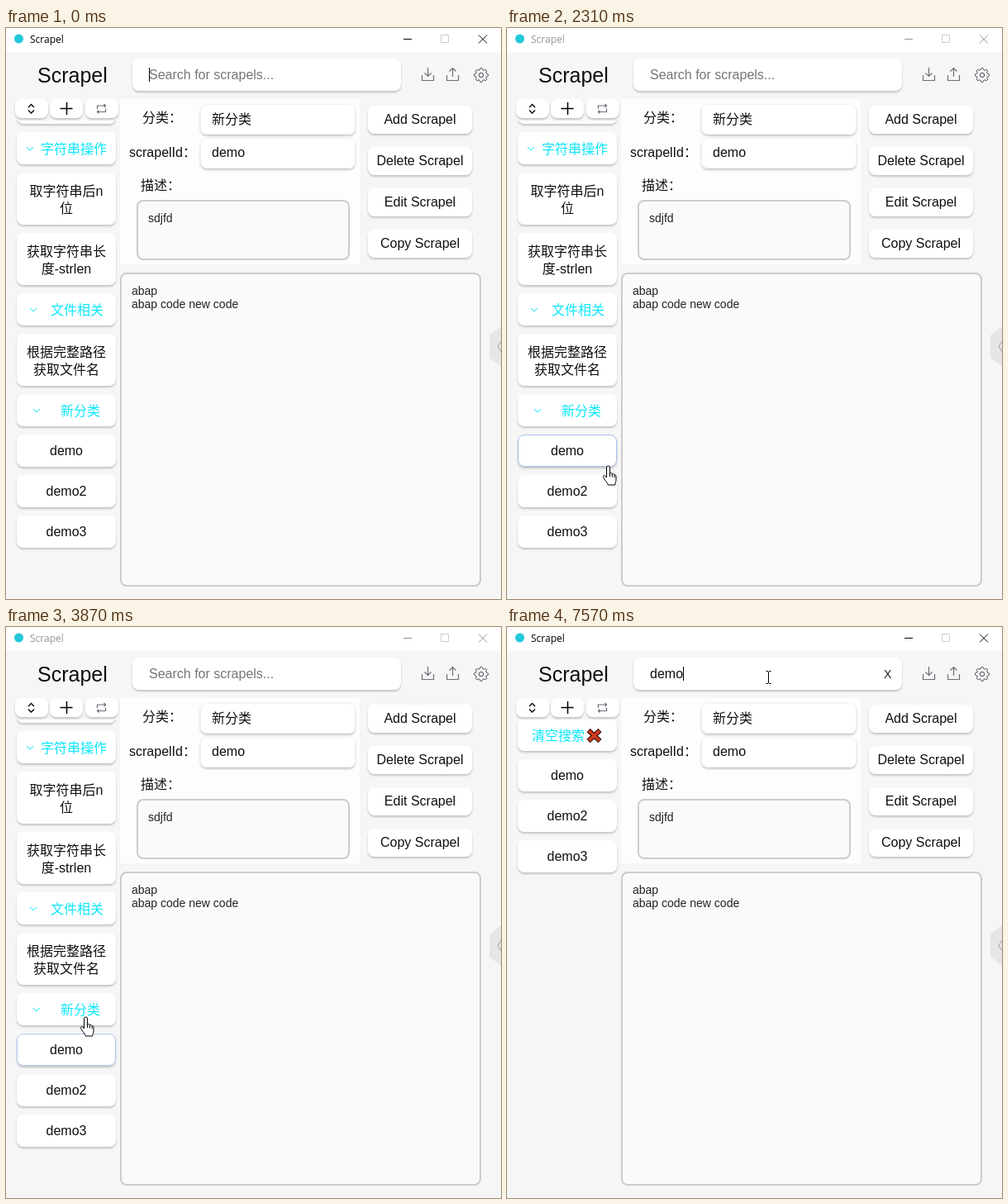
Recreate the animation shown at these times as an HTML page. Size 599 by 691 pixels, loop 8 s.

```html
<!DOCTYPE html>
<html lang="zh">
<head>
<meta charset="utf-8">
<title>Scrapel</title>
<style>
  html, body { margin: 0; width: 100%; height: 100%; overflow: hidden; background: #f6f6f6; }
  svg { display: block; width: 599px; height: 691px; }
  text { font: 16px "Liberation Sans", "Noto Sans CJK SC", "Noto Sans CJK", sans-serif; fill: #0f0f0f; white-space: pre; }
  .title { font: 12px "Open Sans", "Noto Sans", sans-serif; fill: #000; }
  .head { font-size: 25px; }
  .small { font-size: 14px; fill: #222; }
  .mid { text-anchor: middle; }
  .cyan { fill: #0ae6fa; }
  .hint { fill: #757575; }
  .btn { fill: #fff; filter: drop-shadow(0 2px 1px rgba(0, 0, 0, .2)); }
  .rim { fill: none; stroke: #f1f1f1; }
  .area { fill: #fafafa; stroke: #ccc; stroke-width: 2; }
  .line { fill: none; stroke: #000; }
  .icon { fill: none; stroke: #6b6f76; stroke-width: 1.2; }
  .gear { fill: none; stroke: #484c55; }
  .tick { fill: none; stroke: #0ae6fa; }
  .hover { fill: none; stroke: #396cd8; opacity: 0; }
  .cur { stroke: #000; fill: #fff; stroke-linejoin: round; }
</style>
</head>
<body>
<svg viewBox="0 0 599 691">
  <rect width="599" height="29" fill="#fff"/>
  <circle cx="15.5" cy="13" r="5.5" fill="#24c8db"/>
  <g id="frame">
    <text class="title" x="29" y="18">Scrapel</text>
    <path class="line" d="M481 13.5h10M572 8.5l10 10M582 8.5l-10 10"/>
  </g>
  <path fill="none" stroke="#ccc" d="M526.5 8.5h9v9h-9z"/>
  <text class="head" x="38" y="66">Scrapel</text>
  <path class="icon" d="M503.5 57v6.5h14V57M510.5 48v10.5M506.5 54.5l4 4 4-4"/>
  <path class="icon" d="M533.5 57v6.5h14V57M540.5 59V48.5M536.5 52.5l4-4 4 4"/>
  <g id="gear"></g>

  <rect x="138" y="86" width="290" height="200" fill="#fdfdfd"/>
  <g id="fields"></g>
  <g id="actions"></g>

  <text class="hint" id="hint" x="173" y="62">Search for scrapels...</text>
  <text id="query" x="173" y="62"></text>
  <text class="small" id="clear" x="456" y="62">X</text>
  <rect id="caret" y="48" width="1" height="17"/>
  <text x="165" y="114">分类：</text>
  <text x="149" y="156">scrapelId：</text>
  <text x="163" y="196">描述：</text>
  <text x="249" y="116">新分类</text>
  <text x="249" y="156">demo</text>
  <text class="small" x="172" y="235">sdjfd</text>
  <text class="small" x="152" y="323">abap</text>
  <text class="small" x="152" y="339">abap code new code</text>

  <path fill="#e6e6e6" d="M599 361l-14 11v27l14 11z"/>
  <path fill="none" stroke="#999" d="M600 378l-5 7.5 5 7.5"/>

  <clipPath id="view"><path d="M0 112h137v579H0z"/></clipPath>
  <g clip-path="url(#view)"><g id="all"></g><g id="hits"></g></g>

  <g id="tools"></g>
  <path class="line" stroke-width="1.3" d="M27 96l3.500-3.500L34 96M27 99.500l3.500 3.500 3.500-3.500"/>
  <path class="line" stroke-width="1.5" d="M65.500 97.500h15M73.500 90v15"/>
  <path class="icon" d="M110.500 98v-4h10M118.500 92l2 2-2 2M120.500 97.500v4h-10M112.500 99.500l-2 2 2 2"/>

  <g id="pointer">
    <path class="cur" id="arrow" d="M.5 .5v16l3.800-3.600 2.600 6 2.300-1-2.500-5.800h5.200z"/>
    <g class="cur" id="hand">
      <path d="M-2.500 2A2 2 0 0 1 1.500 2V9C2.500 8.200 4 8.400 4.300 9.800 5.300 9.200 6.700 9.500 7 10.800 8 10.500 9 11 9 12.800V17C9 19 7.800 20 7.800 23H-.7C-.7 21-5 17-6.500 13.500-7 12-5.500 10.700-4.300 12L-2.500 14Z"/>
      <path fill="none" d="M1.500 9v4M4.300 10v3.500M7 11v3"/>
    </g>
    <path class="line" id="beam" d="M-2.500-7.500H0M1-7.500H3.500M.5-7V7M-2.500 7.500H0M1 7.500H3.500"/>
  </g>
</svg>
<script>
const LOOP = 8000, BLUR = 190, FOCUS = 4660, BLINK = 510, FADE = 250;
const $ = id => document.getElementById(id);
const clamp = v => Math.max(0, Math.min(1, v));
const show = (id, on) => { $(id).style.display = on ? '' : 'none'; };

// Each zone gives the pointer its shape
const zones = [];
const zone = (shape, x, y, w, h) => zones.push({ shape, x, y, w, h });
const inside = (z, x, y) => x >= z.x && x < z.x + z.w && y >= z.y && y < z.y + z.h;

const rect = (cls, x, y, w, h, inset = 0) =>
  `<rect class="${cls}" x="${x + inset}" y="${y + inset}" width="${w - 2 * inset}" height="${h - 2 * inset}" rx="${8 - inset}"/>`;
const label = (x, y, s, cls = '') => `<text class="mid ${cls}" x="${x}" y="${y}">${s}</text>`;

function field(x, y, w, h) {
  zone('beam', x, y, w, h);
  return rect('btn', x, y, w, h);
}
function area(x, y, w, h) {
  zone('beam', x, y, w, h);
  return rect('area', x, y, w, h, 1);
}
const input = y => field(235, y, 188, 37) + rect('rim', 235, y, 188, 37, .5);

// Sidebar: headings start with '>', long names break at '|'
function stack(y, names, live) {
  return names.map(name => {
    const lines = name.split('|'), tall = lines.length > 1, h = tall ? 63 : 39, top = y;
    y += h + 10;
    if (live) zone('hand', 13, top, 120, h);
    const box = rect('btn', 13, top, 120, h);
    if (name[0] === '>') {
      const s = name.slice(1), dx = 4 * (5 - s.length);
      return box + label(82 + dx, top + 26, s, 'cyan') +
        `<path class="tick" d="M${25 + dx} ${top + 18}l4 4 4-4"/>`;
    }
    if (live) zones.at(-1).glow = true;
    return box + lines.map((s, i) => label(73, top + (tall ? 28 : 25) + 21 * i, s)).join('') +
      (live ? rect('hover', 13, top, 120, h, .5) : '');
  }).join('');
}

const demos = ['demo', 'demo2', 'demo3'];
$('all').innerHTML = rect('btn', 13, 77, 120, 39) + stack(126, [
  '>字符串操作', '取字符串后n|位', '获取字符串长|度-strlen',
  '>文件相关', '根据完整路径|获取文件名', '>新分类', ...demos
], true);
$('hits').innerHTML = rect('btn', 13, 111, 120, 39) + label(62, 137, '清空搜索', 'cyan') +
  '<path id="cross" d="M98.500 125l14 13M112.500 125l-14 13" stroke="#3a1510" stroke-width="6"/>' +
  '<path d="M99 125.500l13 12M112 125.500l-13 12" stroke="#d33a1c" stroke-width="3.6"/>' +
  stack(160, demos);

$('fields').innerHTML = field(153, 37, 325, 39) + input(92) + input(133) +
  area(158, 208, 258, 73) + area(138, 296, 437, 380);
$('actions').innerHTML = ['Add', 'Delete', 'Edit', 'Copy'].map((s, i) => {
  const y = 94 + 50 * i;
  zone('hand', 438, y, 126, 34);
  return rect('btn', 438, y, 126, 34) + label(501, y + 22, s + ' Scrapel');
}).join('');
$('tools').innerHTML = [11, 53, 96].map(x => rect('btn', x, 86, 40, 23)).join('');

// Gear outline: eight teeth around a hub
const teeth = Array.from({ length: 32 }, (_, i) => {
  const a = (i - .5) * Math.PI / 16, r = i % 4 < 2 ? 8.6 : 6.6;
  return `${575 + r * Math.cos(a)},${57 + r * Math.sin(a)}`;
}).join(' ');
$('gear').innerHTML = `<polygon class="gear" points="${teeth}"/><circle class="gear" cx="575" cy="57" r="2.7"/>`;

// Pointer stops: time, x, y
const stops = [
  [490, 309, 86], [1200, 560, 522], [1670, 290, 68], [1770, 255, 48], [2000, 142, 495],
  [2690, 97, 577], [2890, 97, 578], [3170, 95, 605], [3490, 93, 532], [3870, 97, 472],
  [4090, 97, 472], [4180, 150, 440], [4520, 316, 61]
];
function pointerAt(t) {
  const i = stops.findIndex(s => s[0] > t);
  const [a, b] = i < 0 ? [stops.at(-1), stops.at(-1)] : [stops[Math.max(0, i - 1)], stops[i]];
  const u = clamp((t - a[0]) / (b[0] - a[0] || 1)), e = u * u * (3 - 2 * u);
  return [1, 2].map(k => Math.round(a[k] + (b[k] - a[k]) * e));
}

// Share of the last moments the pointer spent in a zone
function glow(z, t) {
  const n = 16;
  let hit = 0;
  for (let i = 0; i < n; i++) hit += inside(z, ...pointerAt(t - FADE * i / n));
  return hit / n;
}

const leaves = zones.filter(z => z.glow);
const outlines = document.querySelectorAll('.hover');
const keys = [5520, 6120, 6340, 6500];

function draw(t) {
  const fade = t < FOCUS ? 1 - clamp((t - BLUR) / 70) : clamp((t - FOCUS) / 60);
  $('frame').style.opacity = .42 + .58 * fade;

  const typed = keys.filter(k => t >= k).length;
  $('query').textContent = 'demo'.slice(0, typed);
  show('hint', !typed);
  show('clear', typed);

  // The caret blinks anew from each key press
  const since = t - [0, FOCUS, ...keys].findLast(k => t >= k);
  show('caret', (t < BLUR || t >= FOCUS) && Math.floor(since / BLINK) % 2 === 0);
  $('caret').setAttribute('x', Math.floor(173 + $('query').getComputedTextLength()));

  const found = t >= 7550;
  show('all', !found);
  show('hits', found);
  leaves.forEach((z, i) => { outlines[i].style.opacity = glow(z, t); });

  const [x, y] = pointerAt(t);
  const over = zones.find(z => inside(z, x, y));
  const shape = over ? over.shape : 'arrow';
  show('pointer', t >= stops[0][0]);
  $('pointer').setAttribute('transform', `translate(${x} ${y})`);
  for (const s of ['arrow', 'hand', 'beam']) show(s, s === shape);
}

const start = performance.now();
function tick() {
  draw((performance.now() - start) % LOOP);
  requestAnimationFrame(tick);
}
tick();
</script>
</body>
</html>
```
